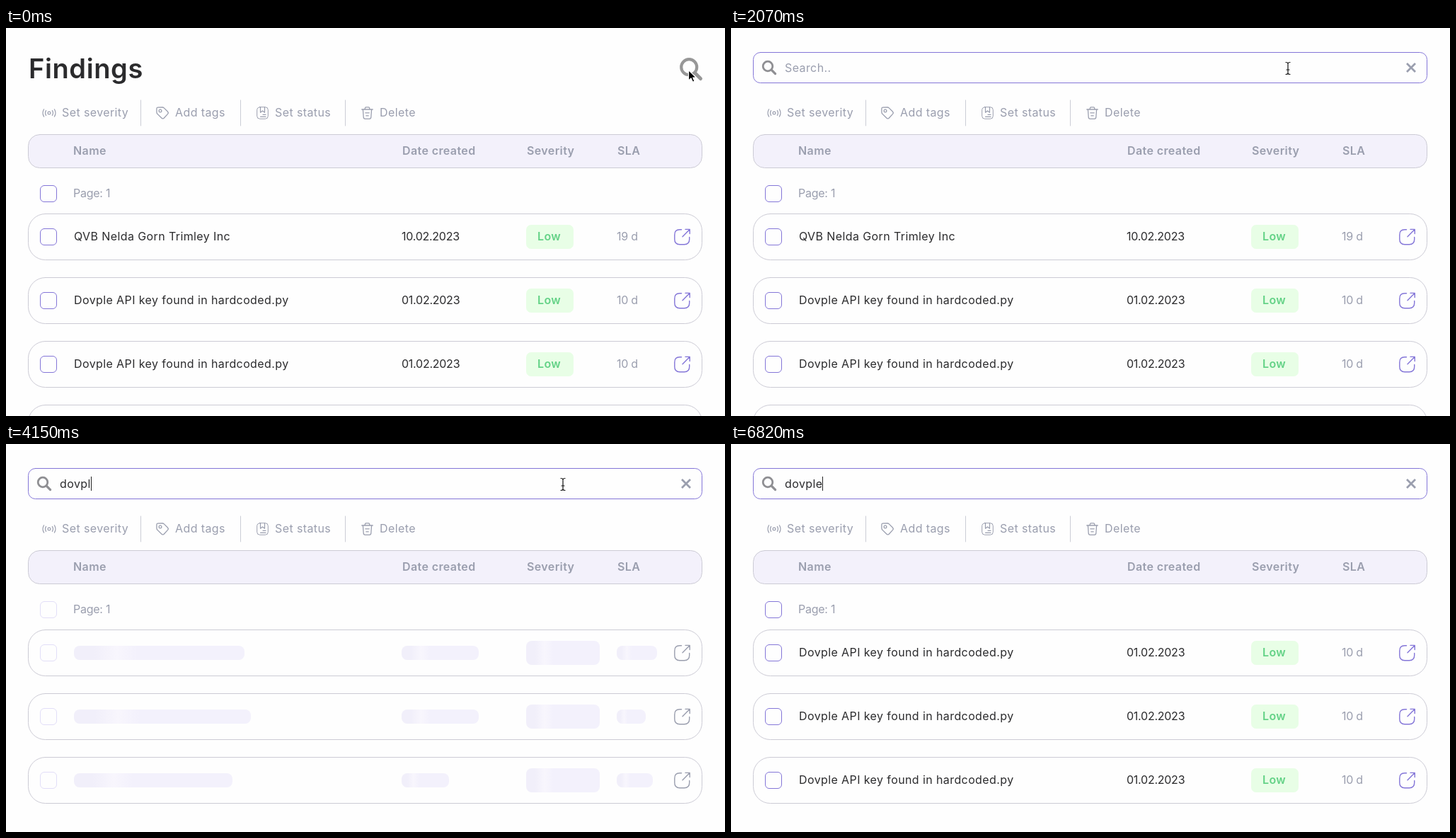
These frames come from a looping animation (1016x548 px, 6.95 s). An HTML page:

```html
<!DOCTYPE html>
<html lang="en">
<head>
<meta charset="utf-8">
<title>Findings search</title>
<style>
  html, body { margin: 0; width: 100%; height: 100%; overflow: hidden; background: #fefefe; }
  svg { display: block; font: 16px Inter, "Open Sans", sans-serif; fill: none; stroke-linecap: round; stroke-linejoin: round; }
  text { fill: #2b2b2d; letter-spacing: .4px; }
  .grey { fill: #9a9eae; }
  .semi { font-weight: 600; }
  .num { letter-spacing: -.25px; }
  .title { font-size: 38px; letter-spacing: .6px; }
</style>
</head>
<body>
<svg id="stage" width="1016" height="548" viewBox="0 0 1016 548"></svg>
<script>
const LOOP = 6950;
const GREY = '#9a9eae', PURPLE = '#8476d8', LINE = '#cccbd5';
const stage = document.getElementById('stage');

// Each event overrides part of the state from its time on.
const events = [
  [0, { cursor: ['arrow', 964, 59], open: false, caret: false, typed: '', mode: 'all' }],
  [150, { cursor: ['arrow', 968, 64] }],
  [290, { cursor: ['hand', 963, 62] }],
  [440, { cursor: ['hand', 962, 59] }],
  [890, { cursor: ['hand', 965, 58] }],
  [1040, { cursor: ['hand', 967, 59] }],
  [1190, { cursor: ['hand', 964, 57] }],
  [1480, { cursor: ['hand', 963, 56] }],
  [1630, { open: true, caret: true }],
  [1920, { cursor: ['beam', 808, 57] }],
  [2070, { cursor: ['beam', 787, 57], caret: false }],
  [2510, { caret: true }],
  [2960, { typed: 'd' }],
  [3110, { typed: 'do', mode: 'loading' }],
  [3260, { mode: 'shimmer' }],
  [3550, { typed: 'dov' }],
  [4000, { typed: 'dovp' }],
  [4150, { typed: 'dovpl' }],
  [4750, { typed: 'dovple' }],
  [5190, { caret: false }],
  [5490, { mode: 'found' }],
  [5630, { caret: true }],
  [6080, { cursor: ['beam', 863, 58], caret: false }],
  [6520, { cursor: ['arrow', 958, 330] }],
  [6670, { cursor: ['arrow', 996, 532], caret: true }],
  [6820, { cursor: null }],
];

const text = (x, y, str, cls = '', extra = '') =>
  `<text x="${x}" y="${y}" class="${cls}" ${extra}>${str}</text>`;
const box = (x, y, w, h, r, fill, stroke = 'none') =>
  `<rect x="${x}" y="${y}" width="${w}" height="${h}" rx="${r}" fill="${fill}" stroke="${stroke}"/>`;
const path = (d, stroke, width = 1, extra = '') =>
  `<path d="${d}" stroke="${stroke}" stroke-width="${width}" ${extra}/>`;
const at = (x, y, body) => `<g transform="translate(${x} ${y})">${body}</g>`;
const checkbox = (y, color) => box(48.5, y + .5, 23, 23, 5.5, '#fefefe', color);

const beam = 'M-3-8.5Q-.4-8.5 0-7Q.4-8.5 3-8.5M0-7V7M-2 2H2M-3 8.5Q-.4 8.5 0 7Q.4 8.5 3 8.5';
const cursors = {
  arrow: path('M.5 .5V15.2L4 12L6.4 17.3L9 16.2L6.7 11.1H11.3Z', '#fff', 1.2, 'fill="#000"'),
  hand: path('M5.2 11V2.4a1.5 1.5 0 0 1 3 0V7q1.5-1 2.5 .4q1.5-.9 2.5 .5q2.2-.5 2.8 1.5v3q-.1 2-1.6 4V18.3H7v-1.6L1.8 11.6q-1.5-2 .5-2.6q1.6 0 2.9 2Z', '#000', 1.1, 'fill="#fff"')
    + path('M8.2 7v3M10.7 7.5v2.6M13.2 8.2v2.2M8.4 13v3M10.4 13v3M12.4 13v3', '#000', .8),
  beam: path(beam, '#fff', 2.6) + path(beam, '#111', 1.2),
};

const tools =
  at(61, 120, path('M-4.4-3.4Q-6.6 0-4.4 3.4M4.4-3.4Q6.6 0 4.4 3.4M-7.4-5.2Q-10.6 0-7.4 5.2M7.4-5.2Q10.6 0 7.4 5.2', GREY, 1.2)
    + `<circle r="1.9" stroke="${GREY}" stroke-width="1.2"/>`)
  + at(212, 111, path('M2.4 1.2L9 1Q10.3 1 11.2 1.9L16.6 7.2Q18 8.8 16.6 10.4L11.2 16.2Q9.6 17.6 8 16.2L2 10.4Q.9 9.4 .9 8V2.8Q.9 1.3 2.4 1.2Z', GREY, 1.3)
    + `<circle cx="6" cy="6" r="1.9" stroke="${GREY}" stroke-width="1.2"/>`)
  + at(354, 111, box(.7, .7, 15.6, 16.6, 4, 'none', GREY)
    + path('M5.5 .8V8.3L8.5 6L11.5 8.3V.8M9 11.3H13M5.5 14.3H13', GREY, 1.2))
  + at(502, 111, path('M.8 4H16.2M5 3.6L5.6 1.6Q5.9.8 6.8.8H10.2Q11.1.8 11.4 1.6L12 3.6M2.4 4.2L3.2 15Q3.4 17.3 5.4 17.3H11.6Q13.6 17.3 13.8 15L14.6 4.2M5.8 8.8H11.2M6.8 12.8H10.2', GREY, 1.3))
  + path('M190.5 102V138M331.5 102V138M479.5 102V138', '#cbcdd6')
  + [[79, 'Set severity'], [239, 'Add tags'], [380, 'Set status'], [528, 'Delete']]
    .map(([x, s]) => text(x, 125, s, 'grey')).join('');

const header = box(31.5, 150.5, 952, 47, 16, '#f3f1fb', LINE)
  + [[95, 'Name'], [560, 'Date created'], [736, 'Severity'], [864, 'SLA']]
    .map(([x, s]) => text(x, 179, s, 'grey semi')).join('');

const defs = `<linearGradient id="shine">
  <stop offset=".12" stop-color="#f1effa"/><stop offset=".25" stop-color="#f8f6fd"/>
  <stop offset=".37" stop-color="#f3f1fc"/></linearGradient>`;

// Widths of the placeholder bars: name, date, SLA
const bars = [[241, 109, 57], [250, 109, 41], [224, 67, 51]];

function topBar(s) {
  if (!s.open) {
    return text(32, 71, 'Findings', 'semi title')
      + path('M974 64L981.5 71.5', '#979797', 5)
      + '<circle cx="965.2" cy="55.2" r="11" stroke="#979797" stroke-width="4.2"/>';
  }
  return box(31.5, 34.5, 952, 43, 10, '#fefefe', PURPLE)
    + '<circle cx="52" cy="54" r="6.8" stroke="#8f8f93" stroke-width="2.8"/>'
    + path('M57.5 59.5L62.6 64.6', '#8f8f93', 3.2)
    + path('M955 50L967 62M967 50L955 62', GREY, 2.8, 'stroke-linecap="butt"')
    + (s.typed ? '' : text(76, 62, 'Search..', 'grey'))
    + text(76, 62, s.typed, '', 'id="typed"');
}

function row(i, s, busy) {
  const y = 262 + 90 * i;
  let out = box(31.5, y + .5, 952, 65, 24, '#fefefe', LINE);
  if (i > 2) return out;
  out += checkbox(y + 21, busy ? '#e2def8' : PURPLE)
    + at(944, y + 21, path('M10.5 1.8H8Q.8 1.8.8 9V15.5Q.8 22.7 8 22.7H14.5Q21.7 22.7 21.7 15.5V12.5M12 11.7L21.8 1.8M16 1.4H22.2V7.6', busy ? GREY : PURPLE, 1.4));
  if (busy) {
    const fill = s.mode === 'shimmer' ? 'url(#shine)' : '#f3f1fc';
    const [name, date, sla] = bars[i];
    return out + box(96, y + 23, name, 20, 8, fill) + box(559, y + 23, date, 20, 8, fill)
      + box(735, y + 16, 104, 34, 8, fill) + box(863, y + 23, sla, 20, 8, fill);
  }
  const first = i === 0 && s.mode === 'all';
  return out
    + text(96, y + 38, first ? 'QVB Nelda Gorn Trimley Inc' : 'Dovple API key found in hardcoded.py')
    + text(559, y + 38, first ? '10.02.2023' : '01.02.2023', 'num')
    + box(735, y + 16, 67, 34, 7, '#e8fee6')
    + text(751, y + 38, 'Low', 'semi', 'style="fill:#63d286"')
    + text(863, y + 38, first ? '19 d' : '10 d', 'grey num');
}

function render(s) {
  const busy = s.mode === 'loading' || s.mode === 'shimmer';
  const count = s.mode === 'all' || s.mode === 'loading' ? 4 : 3;
  let out = defs + topBar(s) + tools + header
    + checkbox(222, busy ? '#e2def8' : PURPLE) + text(95, 239, 'Page: 1', 'grey num');
  for (let i = 0; i < count; i++) out += row(i, s, busy);
  out += '<rect id="caret" y="46" width="1" height="20" fill="#222" visibility="hidden"/>';
  if (s.cursor) out += at(s.cursor[1], s.cursor[2], cursors[s.cursor[0]]);
  stage.innerHTML = out;
  if (s.open && s.caret) {
    const caret = document.getElementById('caret');
    const end = document.getElementById('typed').getComputedTextLength();
    caret.setAttribute('x', 76 + Math.round(end));
    caret.setAttribute('visibility', 'visible');
  }
}

let shown = 0;
function tick() {
  const t = performance.now() % LOOP;
  const past = events.filter(([time]) => time <= t);
  if (past.length !== shown) {
    shown = past.length;
    render(Object.assign({}, ...past.map(([, change]) => change)));
  }
  requestAnimationFrame(tick);
}
tick();
</script>
</body>
</html>
```
